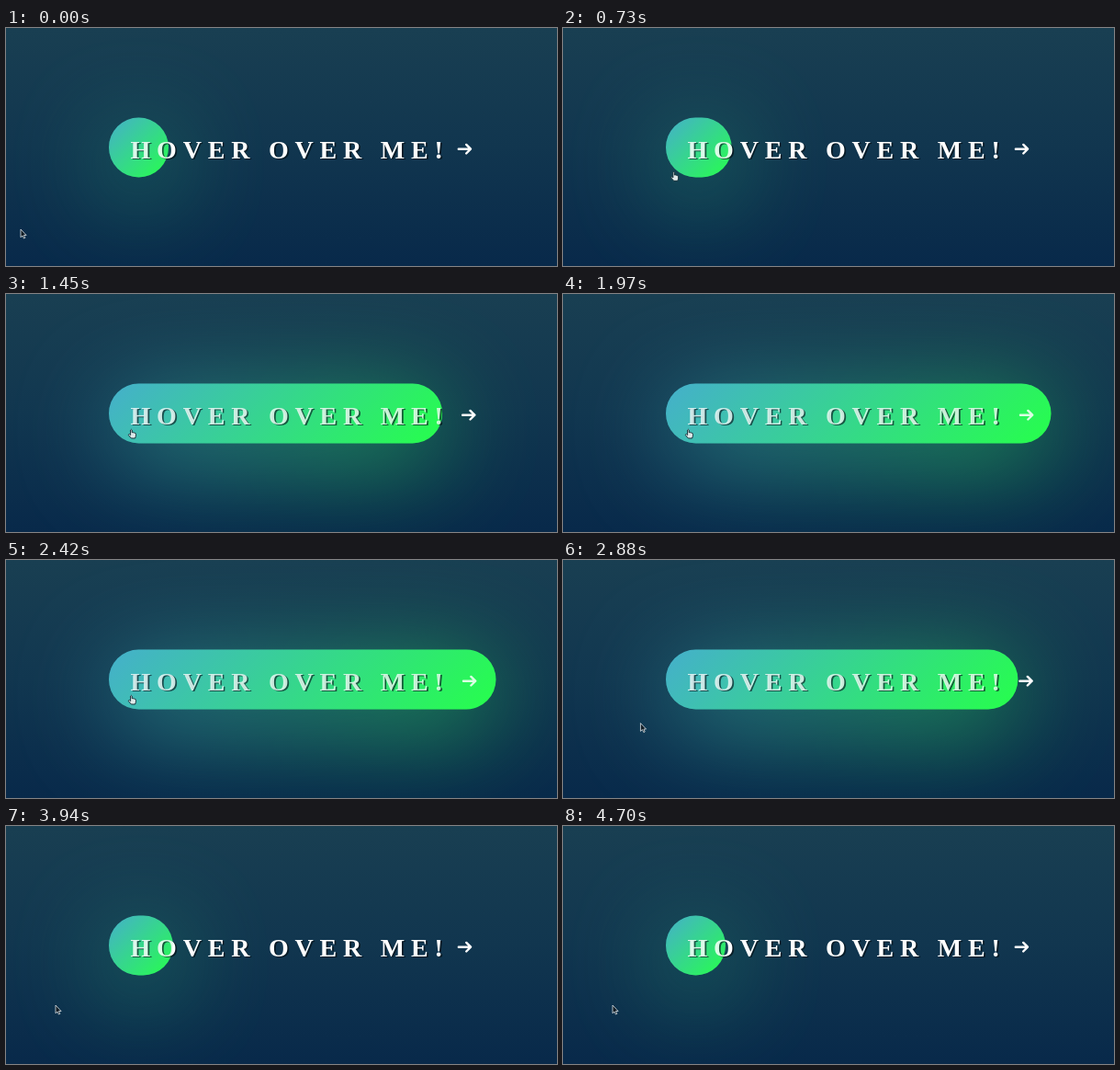
Recreate the animation shown at these times as an HTML page. Size 600 by 259 pixels, loop 4760 ms.

```html
<!DOCTYPE html>
<html lang="en">
<head>
<meta charset="utf-8">
<title>Hover button</title>
<style>
  html, body { margin: 0; width: 100%; height: 100%; overflow: hidden; background: #12354f; }
  svg { display: block; width: 100%; height: 100%; }
  text { font: bold 28px "Liberation Serif", serif; letter-spacing: 6.8px; }
</style>
</head>
<body>
<svg viewBox="0 0 600 259">
  <defs>
    <linearGradient id="sky" x2="0" y2="1">
      <stop stop-color="#193f52"/>
      <stop offset=".5" stop-color="#11364f"/>
      <stop offset="1" stop-color="#08294a"/>
    </linearGradient>
    <linearGradient id="mint" gradientUnits="userSpaceOnUse">
      <stop stop-color="#45afcc"/>
      <stop offset="1" stop-color="#26ff4b"/>
    </linearGradient>
    <filter id="halo" filterUnits="userSpaceOnUse" x="-120" y="-120" width="840" height="520" color-interpolation-filters="sRGB">
      <feGaussianBlur stdDeviation="54"/>
    </filter>
    <filter id="soft"><feGaussianBlur stdDeviation=".6"/></filter>
  </defs>
  <rect width="600" height="259" fill="url(#sky)"/>
  <g fill="url(#mint)">
    <g transform="translate(0 18)" opacity=".66">
      <rect class="pill" x="112" y="97.5" height="65" rx="32.5" filter="url(#halo)"/>
    </g>
    <rect class="pill" x="112" y="97.5" height="65" rx="32.5"/>
  </g>
  <text x="137.2" y="143.2" fill="#06141c" opacity=".8" filter="url(#soft)">HOVER OVER ME!</text>
  <text id="label" x="135.5" y="141.5" fill="#fff">HOVER OVER ME!</text>
  <g id="arrow" fill="none" stroke="#fff" stroke-width="2" stroke-linecap="round" stroke-linejoin="round">
    <path d="M1 5H11M8 1L12 5L8 9"/>
  </g>
  <!-- tint over the letters inside the pill -->
  <rect class="pill" x="112" y="97.5" height="65" rx="32.5" fill="url(#mint)" opacity=".17"/>
  <g id="cursor" stroke-linejoin="round">
    <path id="pointer" d="M0 0V8.8L2 7L3.4 10L4.8 9.4L3.5 6.5H6.1Z" fill="#111c24" stroke="#dfe6ea" stroke-width=".8"/>
    <path id="hand" d="M1.6 5.6V1Q2.4 -.4 3.2 1V3.7Q4.2 3 4.8 4Q5.8 3.4 6.2 4.4Q7.4 4 7.4 5.4V7.6L6.6 10H2.4L-.6 6.6Q-.6 5.2 .6 5.6L1.6 6.6Z" fill="#dfeaea" stroke="#17303a" stroke-width="1"/>
  </g>
</svg>
<script>
const LOOP = 4760, ENTER = 684, LEAVE = 2727, DURATION = 1430;
const SMALL = 65, FULL = 421.5;

// time, x, y of the cursor tip
const PATH = [
  [0, 16, 219], [30, 16, 219], [300, 52, 197], [550, 96.5, 169], [684, 112, 160],
  [850, 134, 147], [2560, 134, 147], [2727, 106, 163], [2880, 84.5, 177.5],
  [3070, 69, 186], [3270, 59, 191.5], [3450, 55, 194], [3620, 54, 195], [LOOP, 54, 195]
];

const $ = id => document.getElementById(id);
const pills = document.querySelectorAll(".pill");
const set = (el, attrs) => {
  for (const key in attrs) el.setAttribute(key, attrs[key]);
};

const bezier = (a, b, u) => 3 * a * u * (1 - u) ** 2 + 3 * b * u * u * (1 - u) + u ** 3;

// CSS "ease": cubic-bezier(.25, .1, .25, 1)
function ease(x) {
  if (x <= 0) return 0;
  if (x >= 1) return 1;
  let lo = 0, hi = 1;
  for (let i = 0; i < 24; i++) {
    const mid = (lo + hi) / 2;
    if (bezier(.25, .25, mid) < x) lo = mid; else hi = mid;
  }
  return bezier(.1, 1, lo);
}

function cursorAt(t) {
  const i = PATH.findIndex(p => p[0] > t);
  const [t0, x0, y0] = PATH[i - 1], [t1, x1, y1] = PATH[i];
  const k = (t - t0) / (t1 - t0);
  return [x0 + (x1 - x0) * k, y0 + (y1 - y0) * k];
}

function draw(t) {
  const hover = ease((t - ENTER) / DURATION) - ease((t - LEAVE) / DURATION);
  const width = SMALL + (FULL - SMALL) * hover;
  pills.forEach(pill => set(pill, { width }));

  // 135 degree gradient across the current box
  const cx = 112 + width / 2, cy = 130, reach = (width + SMALL) / 4;
  set($("mint"), { x1: cx - reach, y1: cy - reach, x2: cx + reach, y2: cy + reach });

  set($("label"), { "fill-opacity": 1 - .1 * hover });
  set($("arrow"), { transform: `translate(${491.6 + 5.2 * hover} 125.7) scale(1.2)` });

  const over = t >= ENTER && t < LEAVE;
  set($("cursor"), { transform: `translate(${cursorAt(t).join(" ")})` });
  set($("pointer"), { visibility: over ? "hidden" : "visible" });
  set($("hand"), { visibility: over ? "visible" : "hidden" });
}

const start = performance.now();
function tick() {
  draw((performance.now() - start) % LOOP);
  requestAnimationFrame(tick);
}
tick();
</script>
</body>
</html>
```
